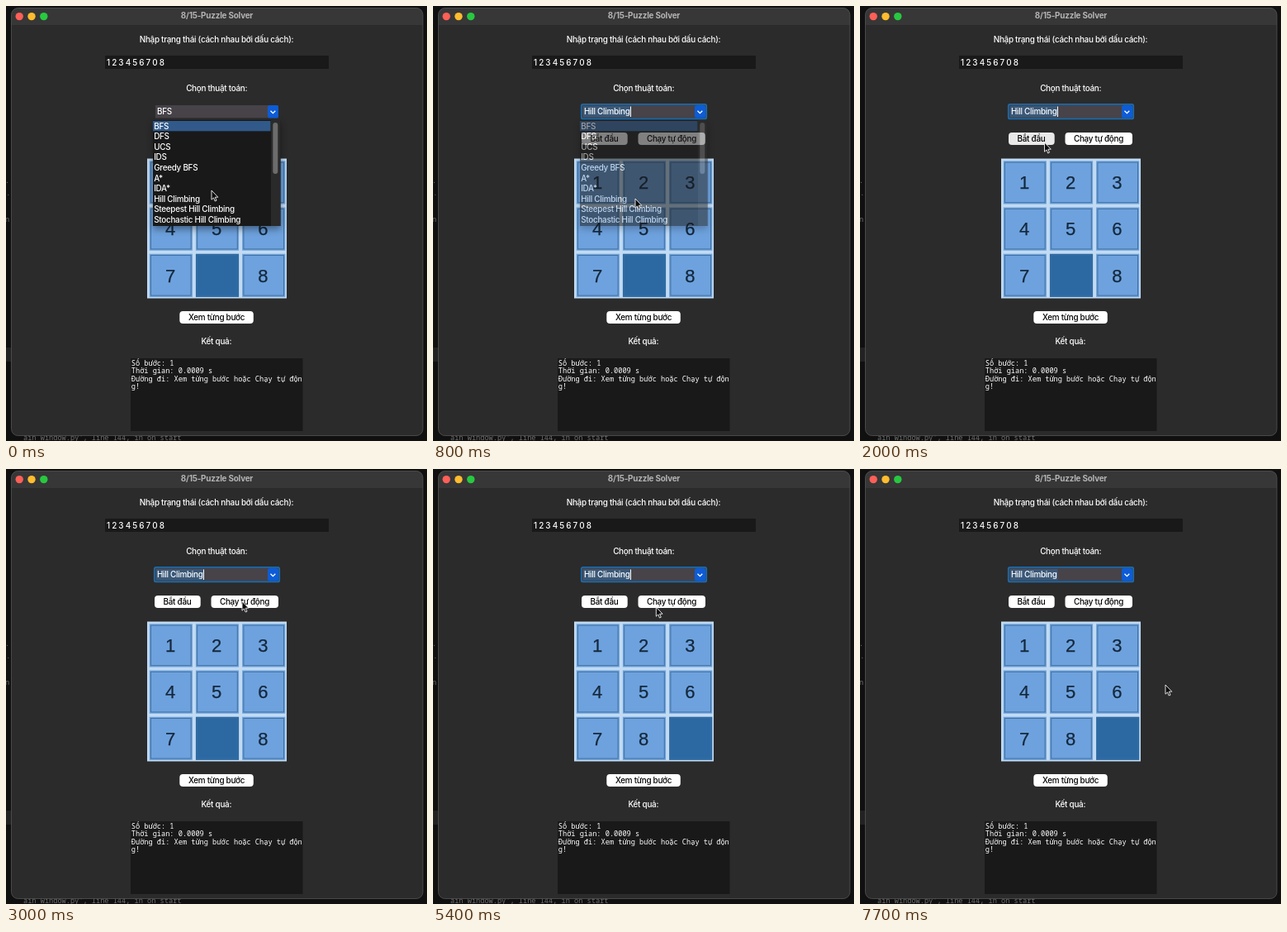
Animation of 510 by 526 pixels, one loop 7.8 s. Source, as an HTML page:

```html
<!DOCTYPE html>
<html lang="vi">
<head>
<meta charset="utf-8">
<title>8/15-Puzzle Solver</title>
<style>
  html, body { margin: 0; height: 100%; overflow: hidden; background: #101010; }
  svg { display: block; }
  text { font: 500 9.9px Inter, sans-serif; letter-spacing: -.27px; fill: #fff; white-space: pre; }
  .mid { text-anchor: middle; }
  .title { font-weight: 700; letter-spacing: -.2px; fill: #b4b4b4; }
  .mono text { font: 500 8.63px "Noto Sans Mono", monospace; letter-spacing: 0; }
  .behind text { fill: #707070; }
  .num { font: 22px "Liberation Sans", Arial, sans-serif; letter-spacing: 0; fill: #14283c; stroke: #14283c; stroke-width: .25; }
  .button rect { fill: #fff; }
  .button text { fill: #000; }
  #list { filter: drop-shadow(0 4px 4px rgba(0, 0, 0, .4)); }
</style>
</head>
<body>
<svg width="510" height="526" viewBox="0 0 510 526">
  <g class="mono behind">
    <rect y="413" width="8" height="17" fill="#222"/>
    <text x="-1" y="214">.</text>
    <text x="-5" y="229">..</text>
    <text x="-1" y="261">n</text>
    <text x="21" y="525">ain window.py", line 144, in on_start</text>
  </g>

  <rect x="6.5" y="2.5" width="498.5" height="517" rx="8" fill="#2b2b2b"/>
  <path d="M6.5 23V10.5a8 8 0 0 1 8-8H497a8 8 0 0 1 8 8V23z" fill="#373737"/>
  <rect x="6.5" y="2.5" width="498.5" height="517" rx="8" fill="none" stroke="#555" stroke-width=".8"/>
  <circle cx="16.2" cy="12.6" r="4.7" fill="#fe5f57"/>
  <circle cx="31" cy="12.6" r="4.7" fill="#febc2e"/>
  <circle cx="45.8" cy="12.6" r="4.7" fill="#28c840"/>
  <text class="mid title" x="255.5" y="15.2">8/15-Puzzle Solver</text>

  <text class="mid" x="255" y="43.7">Nhập trạng thái (cách nhau bởi dấu cách):</text>
  <rect x="120" y="60" width="271" height="16" fill="#191919"/>
  <text x="122" y="71.9">1 2 3 4 5 6 7 0 8</text>
  <text class="mid" x="255.2" y="102.6">Chọn thuật toán:</text>

  <rect x="181" y="120" width="149" height="15.5" fill="#474349"/>
  <g id="focus">
    <rect x="182" y="121" width="57.5" height="13.5" fill="#3a5878"/>
    <rect x="179.8" y="118.8" width="151.4" height="17.6" rx="2" fill="none" stroke="#1d6cae" stroke-width="1.8"/>
    <path id="caret" d="M239.5 121.5V134" stroke="#fff"/>
  </g>
  <rect x="317" y="120" width="13" height="15.5" rx="2.5" fill="#0d5cd6"/>
  <path d="M320.5 126.8l2.9 2.9l2.9-2.9" fill="none" stroke="#fff" stroke-width="1.3"/>
  <text id="choice" x="183" y="131.4"></text>

  <g class="button" id="start">
    <rect x="180" y="153" width="55.7" height="15" rx="4"/>
    <text class="mid" x="207.5" y="164">Bắt đầu</text>
  </g>
  <g class="button" id="auto">
    <rect x="248.5" y="153" width="81.5" height="15" rx="4"/>
    <text class="mid" x="289" y="164">Chạy tự động</text>
  </g>
  <g id="board"><rect x="171" y="184.5" width="169" height="169" fill="#c2dbf2"/></g>
  <g class="button">
    <rect x="210.3" y="369" width="89.5" height="15" rx="4"/>
    <text class="mid" x="255" y="380">Xem từng bước</text>
  </g>

  <text class="mid" x="254.8" y="409.1">Kết quả:</text>
  <rect x="151" y="426" width="208.5" height="88" fill="#191919"/>
  <g class="mono" id="log"></g>

  <g id="list">
    <rect x="178" y="138" width="154.5" height="128" fill="#191919"/>
    <rect x="178" y="139" width="142.5" height="12.3" fill="#315a8a"/>
    <rect x="321" y="138" width="11.5" height="128" fill="#2a2a2a"/>
    <rect x="323.3" y="141" width="6" height="62" rx="3" fill="#6c6c6c"/>
  </g>
  <path id="cursor" d="M0 0V11.2L2.5 8.9L4.2 13L6 12.2L4.3 8.2H7.8Z" fill="#0a0a0a" stroke="#f4f4f4" stroke-width=".9"/>
</svg>
<script>
const $ = id => document.getElementById(id);

function add(parent, tag, attrs, content = "") {
  const el = document.createElementNS("http://www.w3.org/2000/svg", tag);
  for (const name in attrs) el.setAttribute(name, attrs[name]);
  el.textContent = content;
  return parent.appendChild(el);
}

["BFS", "DFS", "UCS", "IDS", "Greedy BFS", "A*", "IDA*", "Hill Climbing",
 "Steepest Hill Climbing", "Stochastic Hill Climbing"].forEach((name, i) =>
  add($("list"), "text", { x: 179.2, y: 148.7 + i * 12.58 }, name));

["Số bước: 1", "Thời gian: 0.0009 s", "Đường đi: Xem từng bước hoặc Chạy tự độn", "g!"].forEach((line, i) =>
  add($("log"), "text", { x: 151.8, y: 434.6 + i * 9.6 }, line));

const cells = Array.from({ length: 9 }, (_, i) => {
  const x = 173.7 + i % 3 * 56.2, y = 187.3 + Math.floor(i / 3) * 56.2;
  const face = add($("board"), "rect", { x, y, width: 52.2, height: 52.2 });
  const edge = add($("board"), "rect", { x: x + 1.8, y: y + 1.8, width: 48.6, height: 48.6, fill: "none", stroke: "#42729f" });
  const label = add($("board"), "text", { class: "num mid", x: x + 25.3, y: y + 33.8 });
  return { face, edge, label };
});

function setBoard(state) {
  cells.forEach(({ face, edge, label }, i) => {
    const blank = state[i] === "0";
    face.setAttribute("fill", blank ? "#2c69a3" : "#6ea2de");
    edge.setAttribute("opacity", blank ? .4 : 1);
    label.textContent = blank ? "" : state[i];
  });
}

// time, x, y of the pointer tip
const path = [
  [0, 249, 223], [500, 245, 233], [1100, 245, 233], [1700, 223.5, 165],
  [2800, 223.5, 165], [3000, 286, 160], [3200, 289, 159], [3300, 289, 159],
  [3500, 292, 159], [5100, 292, 159], [5400, 270.3, 167], [5900, 370, 261], [7800, 370, 261]
];

function pointerAt(t) {
  const i = path.findIndex(p => p[0] > t);
  const [t0, x0, y0] = path[i - 1], [t1, x1, y1] = path[i];
  const u = (t - t0) / (t1 - t0), k = u * u * (3 - 2 * u);
  return [x0 + (x1 - x0) * k, y0 + (y1 - y0) * k];
}

function press(id, down) {
  $(id).firstElementChild.style.fill = down ? "#e9e9e9" : "#fff";
}

function draw() {
  const t = Math.floor(performance.now() % 7800 / 100) * 100;
  const chosen = t >= 800;
  $("choice").textContent = chosen ? "Hill Climbing" : "BFS";
  $("focus").setAttribute("opacity", chosen ? 1 : 0);
  $("caret").setAttribute("opacity", (t - 800) % 900 < 600 ? 1 : 0);
  $("list").setAttribute("opacity", !chosen ? 1 : t < 900 ? .55 : t < 1000 ? .2 : 0);
  press("start", t === 2000);
  press("auto", t === 3800);
  setBoard(t < 3900 ? "123456708" : "123456780");
  $("cursor").setAttribute("transform", `translate(${pointerAt(t)})`);
  requestAnimationFrame(draw);
}
draw();
</script>
</body>
</html>
```
